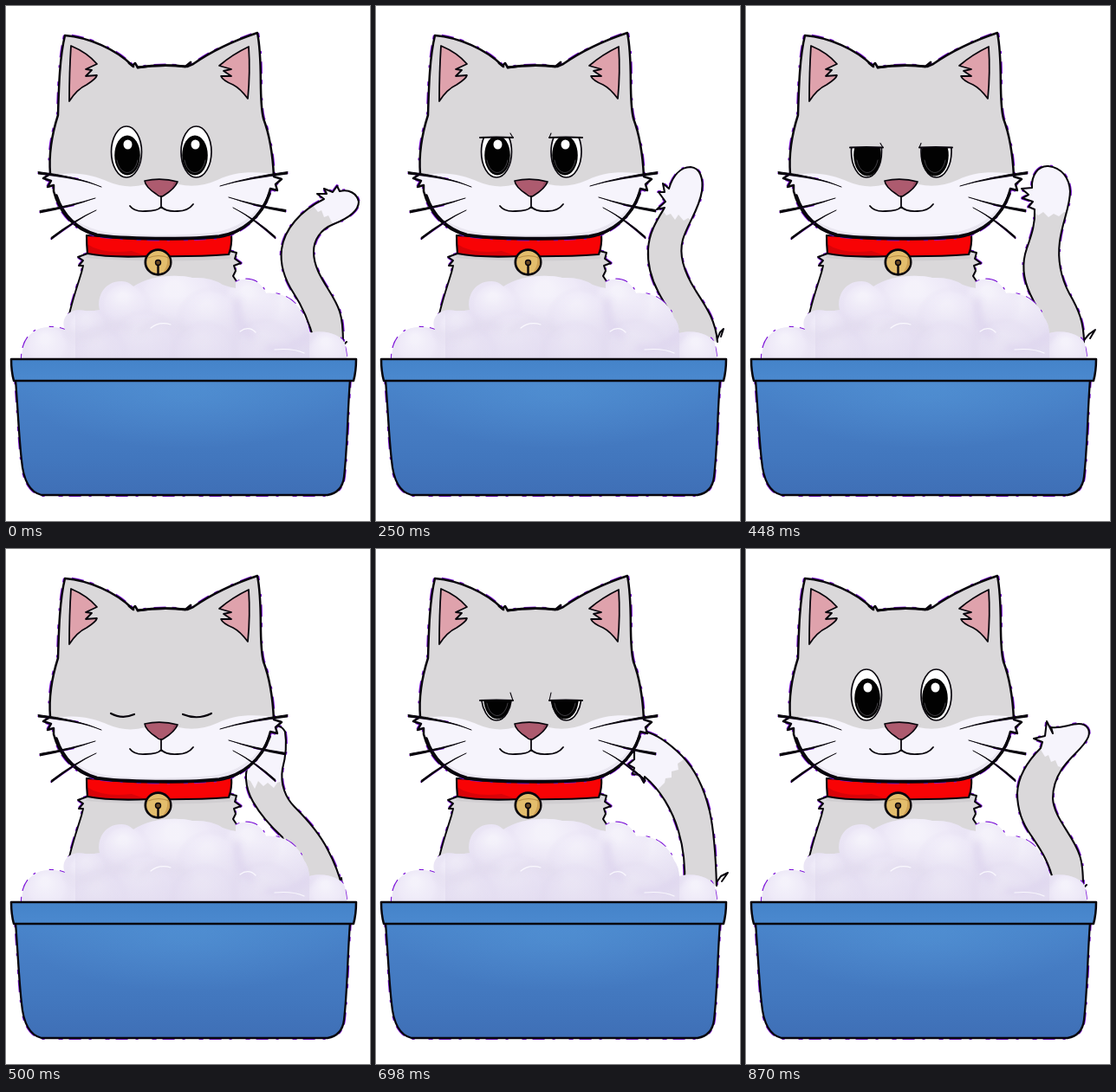
Animation, 420 px wide and 595 px high, one loop 1 s. Source, as an HTML page with a canvas:

```html
<!DOCTYPE html>
<html lang="en">
<head>
<meta charset="utf-8">
<title>Cat in a bath</title>
<style>
html, body { margin: 0; width: 100%; height: 100%; overflow: hidden; background: #fff; }
canvas { display: block; width: 420px; height: 595px; }
</style>
</head>
<body>
<canvas id="stage" width="420" height="595"></canvas>
<script>
const ctx = document.getElementById('stage').getContext('2d');
ctx.lineCap = ctx.lineJoin = 'round';

const INK = '#08050c', GREY = '#dad8da', WHITE = '#f6f4fc', PURPLE = '#7d14d8';

function fill(d, color) {
  ctx.fillStyle = color;
  ctx.fill(new Path2D(d));
}

function line(d, width = 2, color = INK) {
  ctx.strokeStyle = color;
  ctx.lineWidth = width;
  ctx.stroke(new Path2D(d));
}

// Broken purple edge, drawn before the fill so only its outer half shows
function fringe(d, width) {
  ctx.save();
  ctx.lineCap = 'butt';
  ctx.setLineDash([5, 7, 14, 9, 3, 16]);
  line(d, width, PURPLE);
  ctx.restore();
}

function ellipse(x, y, rx, ry, color, stroke = 0) {
  ctx.beginPath();
  ctx.ellipse(x, y, rx, ry, 0, 0, Math.PI * 2);
  ctx.fillStyle = color;
  ctx.fill();
  if (stroke) {
    ctx.strokeStyle = INK;
    ctx.lineWidth = stroke;
    ctx.stroke();
  }
}

function clipped(d, draw) {
  ctx.save();
  ctx.clip(new Path2D(d));
  draw();
  ctx.restore();
}

function gradient(y0, y1, ...colors) {
  const g = ctx.createLinearGradient(0, y0, 0, y1);
  colors.forEach((c, i) => g.addColorStop(i / (colors.length - 1), c));
  return g;
}

// Each tail: outline, white tip area, small tuft at the root
const TAILS = {
  right: {
    shape: 'M356 388C350 366 342 347 332 332C321 315 316 297 318 281C321 258 340 236 367 223L359 217L370 217L367 211L377 215L382 208L385 214C396 211 405 217 407 226C407 237 393 246 378 252C363 258 355 270 355 284C355 311 378 330 385 353C389 365 389 378 389 390',
    tip: 'M353 229L360 238L364 236L367 244L372 242L376 250L382 253L415 240V200H350Z',
    tuft: 'M389 392L393 388'
  },
  upRight: {
    shape: 'M355 386C350 361 339 346 329 331C318 316 313 299 313 282C314 260 327 243 340 230L342 223L332 219L345 216L347 199L354 213L352 206C364 208 373 202 384 202C393 202 398 209 395 217C390 230 374 239 364 255C357 266 354 276 354 288C355 311 378 331 385 354C389 365 389 378 389 390',
    tip: 'M339 230L345 240L349 238L352 246L357 244L360 251L366 253L410 220V190H326V220Z',
    tuft: 'M389 392L393 388'
  },
  up: {
    shape: 'M350 382C346 360 334 347 326 331C317 314 313 297 314 281C315 261 325 246 333 233L324 235L334 226L326 215L333 215L331 205L338 211C342 198 350 186 363 186C374 187 378 199 376 214C373 235 359 252 354 270C349 288 355 307 369 329C382 349 392 364 394 388',
    tip: 'M330 235L335 242L340 240L345 247L349 241L355 248L360 245L367 249L390 210V178H318V235Z',
    tuft: 'M394 384L397 377L401 373L398 382'
  },
  bent: {
    shape: 'M344 384C343 363 336 349 328 333C319 314 318 297 324 280C330 263 334 251 333 235L326 232L331 226L319 222L326 218L318 211L330 210C329 196 337 184 349 185C365 187 373 199 374 214C374 232 365 249 362 272C359 296 364 315 373 332C384 351 390 366 390 389',
    tip: 'M328 233L337 242L343 238L349 244L355 240L361 243L367 238L380 240V178H312V230Z',
    tuft: 'M390 386L396 379L403 374L397 384'
  },
  left: {
    shape: 'M340 391L319 333C306 321 293 306 285 292C275 274 275 257 281 245C289 230 298 217 305 209Q316 200 322 211C324 224 323 239 319 254C316 272 323 288 333 298C349 314 362 329 371 347C379 362 384 374 388 391',
    tip: 'M272 262L282 268L287 277L291 268L297 274L302 270L309 276L313 270L322 267L335 230V195H270Z',
    tuft: 'M386 386L387 380L388 390'
  },
  behind: {
    shape: 'M356 390C357 369 355 346 349 326C342 302 328 278 310 263L309 270L304 261L296 260L298 253L291 249L298 243L298 226Q302 212 311 211C327 215 341 227 353 239C370 256 379 278 385 303C390 325 392 355 393 389',
    tip: 'M326 277L333 270L334 265L341 264L341 257L349 255L348 248L354 244L360 232L310 200H280V277Z',
    tuft: 'M393 385L398 378L406 374L399 384'
  }
};

// Eye lid heights; null is fully open
const OPEN = null, SHUT = 'shut';
const KEYS = [
  [0, 'right', OPEN],
  [250, 'up', 152],
  [370, 'bent', 163.5],
  [500, 'left', SHUT],
  [620, 'behind', 175],
  [750, 'bent', 163.5],
  [870, 'upRight', OPEN]
];

function drawTail({ shape, tip, tuft }) {
  fringe(shape, 3.8);
  fill(shape, GREY);
  clipped(shape, () => fill(tip, WHITE));
  line(shape, 2.1);
  line(tuft, 2);
}

const SIDES = [
  'M94 286L83 290L89 294L84 300L89 300L87 308C81 328 74 347 70 370',
  'M258 283L266 285L264 292L271 297L263 300L265 306L262 312L266 318'
];

function drawBody() {
  SIDES.forEach(d => fringe(d, 3.4));
  fill(`${SIDES[0]}L72 410H266V318L262 312L265 306L263 300L271 297L264 292L266 285L258 283Z`, GREY);
  ctx.globalAlpha = .35;
  fill('M94 287H258L260 292Q180 298 92 291Z', '#bcb9bf');
  ctx.globalAlpha = 1;
  SIDES.forEach(d => line(d, 2));
}

function drawCollar() {
  const band = 'M93 265Q93 276 94 286Q119 291 166 289Q218 290 257 287Q261 276 260 264Q178 272 93 265Z';
  fill(band, '#f80305');
  clipped(band, () => fill('M92 274Q110 287 145 283L168 291H92Z', '#d90308'));
  line(band, 2.2);
  ellipse(175.5, 296, 14.7, 14.3, '#e3bd6c', 2.7);
  clipped('M162 296a13.5 13 0 1 0 27 0a13.5 13 0 1 0 -27 0', () =>
    fill('M184 283Q190 296 181 308L194 308V283Z', '#cda052'));
  line('M164 291Q176 286 188 291', 1, '#b98c42');
  ellipse(175.5, 296.5, 3, 3, '#6b4a20', 1.4);
  line('M175.5 300V309', 2.4);
}

const HEAD = 'M68 34C62 59 61 91 60 126C53 148 49 169 51 194L43 199L52 202L48 209L55 207L55 214C61 238 78 258 104 265C132 270 210 271 246 267C275 263 299 238 305 211L313 213L311 206L318 200L309 197C308 176 305 151 297 130C291 106 297 65 290 31C263 40 236 53 216 67L209 70Q180 67 152 71L149 66L146 69C127 50 95 36 68 34Z';

function drawEars() {
  const ears = [
    'M75 46Q73 76 73 110Q82 96 93 91Q104 84 105 80L92 81L99 74L92 73L105 67Q94 54 75 46Z',
    'M280 47Q282 76 279 107Q270 95 262 91Q250 86 248 81L260 81L251 75L260 73L246 69Q261 56 280 47Z'
  ];
  ears.forEach(d => {
    fill(d, '#dfa2ac');
    line(d, 1.8);
  });
}

function drawHead() {
  fringe(HEAD, 4.2);
  fill(HEAD, GREY);
  clipped(HEAD, () => {
    fill('M45 199C72 189 98 194 118 203Q139 212 161 206H199Q222 211 244 201C266 190 288 191 318 195V275H45Z', WHITE);
    fill('M52 218C68 247 97 260 128 263Q180 267 237 262Q280 257 306 214L302 272H65Z', '#e9e6f0');
  });
  drawEars();
  line(HEAD, 2.5);
  line('M58 219C66 243 83 258 105 264.5C132 269 210 270 246 266C273 262 295 243 304 217', 3.6);
  line('M142 66L147 70M152 71Q180 67 207 70L213 65', 2.8);
}

// Whisker: thin at the face, thick outside
function whisker(x0, y0, cx, cy, x1, y1) {
  const edge = `M${x0} ${y0}Q${cx} ${cy - 1} ${x1} ${y1 - 1.5}`;
  line(`M${cx} ${(y0 + 2 * cy + y1) / 4}L${x1} ${y1}`, 1.7, PURPLE);
  fill(`${edge}L${x1} ${y1 + 1.5}Q${cx} ${cy + 1.2} ${x0} ${y0}Z`, INK);
  line(edge, 1);
}

function drawFace() {
  whisker(110, 209, 83, 198, 37, 193);
  whisker(103, 222, 78, 231, 39, 238);
  whisker(104, 236, 79, 248, 52, 269);
  whisker(247, 208, 282, 198, 325, 193);
  whisker(257, 221, 286, 231, 323, 237);
  whisker(262, 233, 288, 247, 311, 268);
  const nose = 'M160 202Q179 198 198 203Q195 211 182 219Q178 222 173 217Q161 209 160 202Z';
  fill(nose, '#ad5b6f');
  clipped(nose, () => fill('M178 221Q192 213 194 203L201 201V222Z', '#984b61'));
  line(nose, 1.7);
  line('M179 220V232M143 231Q148 238 161 237Q175 237 179 232Q185 238 198 237Q210 237 216 229', 1.8);
}

function drawEye(x, pupilX, lid) {
  const half = lid !== OPEN && lid > 160;
  ctx.save();
  if (lid !== OPEN) {
    ctx.beginPath();
    ctx.rect(x - 25, lid, 50, 60);
    ctx.clip();
  }
  ellipse(x, 168.5, 17.5, 29.5, '#fff', 1.7);
  ellipse(pupilX, 172.5, half ? 15.8 : 14.8, half ? 24 : 23, '#020202');
  ctx.strokeStyle = '#6d6b72';
  ctx.lineWidth = .6;
  ctx.beginPath();
  ctx.ellipse(pupilX, 172, 12.6, 20.5, 0, .3, Math.PI - .3);
  ctx.stroke();
  if (!half) ellipse(pupilX + .5, 160, 5, 5.6, '#fff');
  ctx.restore();
}

function drawEyes(lid) {
  if (lid === SHUT) {
    line('M121 190Q134 197 148 191', 2.2);
    line('M204 191Q221 198 237 190', 2.2);
    return;
  }
  drawEye(139, 140, lid);
  drawEye(219.5, 218, lid);
  if (lid === OPEN) return;
  line(`M120 ${lid}Q139 ${lid - 1} 158 ${lid}M200 ${lid}Q219 ${lid - 1} 238 ${lid}`, 2);
  const rise = lid > 170 ? 9 : 5;
  line(`M155 ${lid - rise}L158 ${lid}M202 ${lid - rise}L200 ${lid}`, 1.1);
}

const FOAM = 'M18 409C18 385 31 370 52 371Q61 371 68 374C62 359 75 348 91 352Q99 353 108 351C104 333 116 317 134 318Q141 318 147 324C164 312 195 309 215 314Q237 313 250 322Q258 325 265 326V319C277 312 294 316 300 332C321 330 338 343 344 360Q349 366 350 378C365 373 387 379 391 390L394 409Z';
const PUFFS = [
  [318, 366, 46], [282, 344, 36], [200, 350, 58], [138, 349, 32], [236, 366, 42],
  [95, 374, 27], [48, 396, 30], [160, 394, 44], [230, 404, 42], [108, 405, 36],
  [300, 402, 42], [371, 398, 25]
];

function drawFoam() {
  const edges = [
    'M18 407C18 385 31 370 52 371Q61 371 68 374',
    'M265 319C277 312 294 316 300 332C321 330 338 343 344 360',
    'M386 383Q391 387 393 405'
  ];
  edges.forEach(d => fringe(d, 2.2));
  fill(FOAM, '#eae5f5');
  clipped(FOAM, () => {
    for (const [x, y, r] of PUFFS) {
      const g = ctx.createRadialGradient(x - r * .1, y - r * .4, r * .15, x, y, r);
      g.addColorStop(0, '#f5f3fbee');
      g.addColorStop(.6, '#f0ecf9aa');
      g.addColorStop(1, '#e6e0f200');
      ctx.fillStyle = g;
      ctx.fillRect(x - r, y - r, 2 * r, 2 * r);
    }
    ctx.fillStyle = gradient(335, 408, '#dcd4ec00', '#dcd4ec66', '#dcd4ec88');
    ctx.fillRect(80, 335, 270, 75);
    ctx.save();
    ctx.filter = 'blur(4px)';
    line('M74 377Q91 388 108 376Q118 363 142 371M155 375Q182 357 207 375', 5, '#e1dbed');
    line('M267 340Q264 369 284 382M302 395Q330 400 349 380', 6, '#ddd4ee');
    ctx.restore();
    line('M167 372Q177 364 190 368M270 376Q280 369 288 377M310 397Q331 395 344 401', 1.2, '#faf9fe');
  });
}

function drawTub() {
  const tub = 'M11 432C14 470 15 500 18 525Q21 560 41 565H371Q388 562 390 544C394 511 394 470 397 432Z';
  const rim = 'M6 408H404Q404 422 401 433H9Q6 422 6 408Z';
  fringe(tub, 3.8);
  fill(tub, gradient(432, 565, '#4985cb', '#467dc4', '#4277be', '#3f6fb6'));
  clipped(tub, () => {
    ctx.translate(210, 445);
    ctx.scale(1, .35);
    const glow = ctx.createRadialGradient(0, 0, 20, 0, 0, 190);
    glow.addColorStop(0, '#5597d877');
    glow.addColorStop(1, '#5597d800');
    ctx.fillStyle = glow;
    ctx.fillRect(-210, -200, 420, 400);
  });
  line(tub, 2.3);
  fill(rim, gradient(408, 433, '#4483c9', '#4b89cf'));
  line(rim, 2.5);
}

function draw(now) {
  const t = now % 1000;
  const [, tail, lid] = KEYS.findLast(key => key[0] <= t);
  ctx.fillStyle = '#fff';
  ctx.fillRect(0, 0, 420, 595);
  drawTail(TAILS[tail]);
  drawBody();
  drawCollar();
  drawHead();
  drawFace();
  drawEyes(lid);
  drawFoam();
  drawTub();
}

const start = performance.now();
function tick() {
  draw(performance.now() - start);
  requestAnimationFrame(tick);
}
tick();
</script>
</body>
</html>
```
